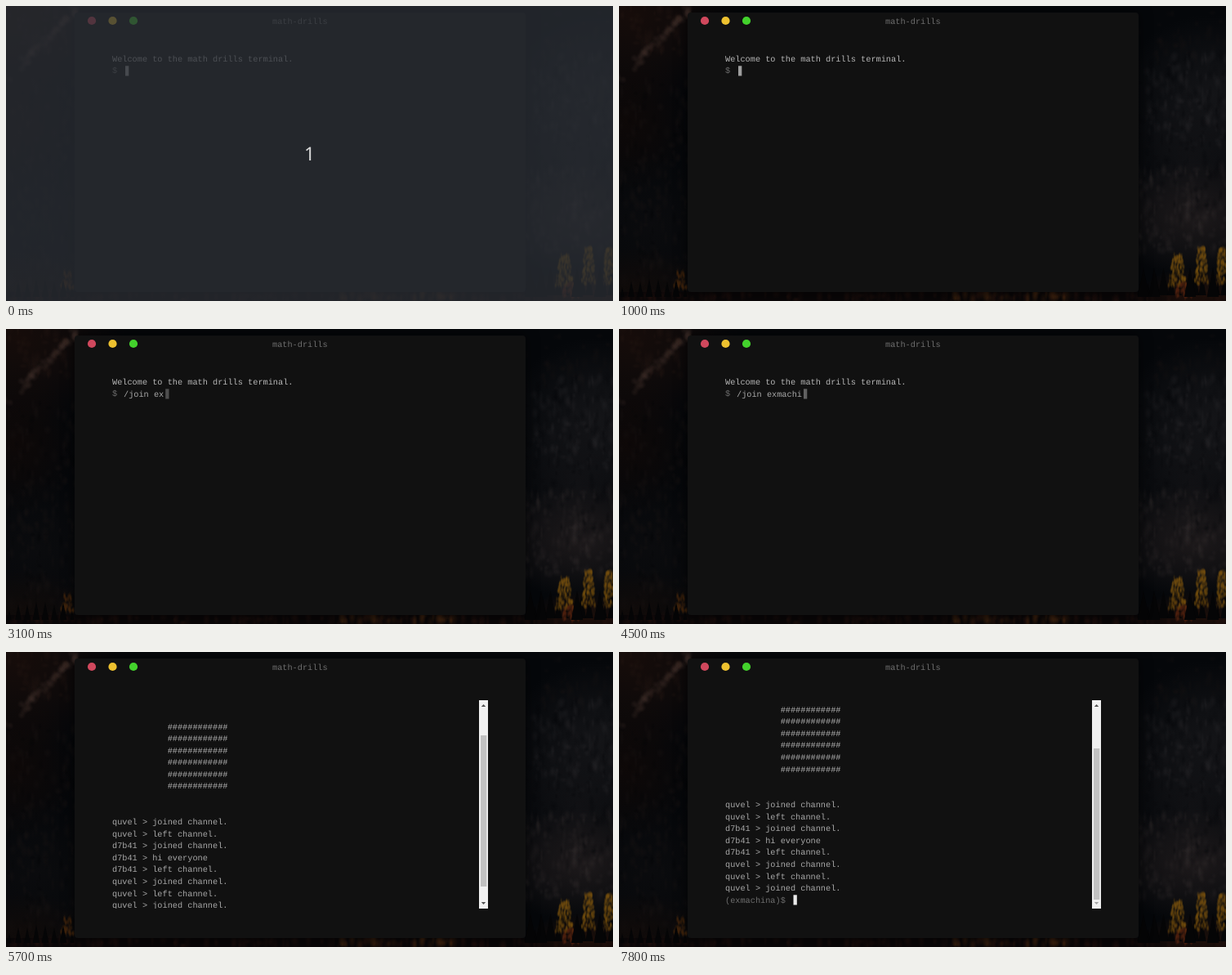
These frames come from a looping animation (743x361 px, 8000 ms). An HTML page with a canvas:

```html
<!DOCTYPE html>
<html lang="en">
<head>
<meta charset="utf-8">
<title>math-drills</title>
<style>
html, body { margin: 0; width: 100%; height: 100%; overflow: hidden; background: #040608; }
canvas { display: block; }
</style>
</head>
<body>
<canvas id="stage" width="743" height="361"></canvas>
<script>
const W = 743, H = 361, LOOP = 8000;
const ctx = document.getElementById('stage').getContext('2d');
const MONO = '10.25px "Liberation Mono", "Courier New", monospace';
const LEFT = 130, CELL = 6.151, TOP = 68.5, ROW = 14.57;
const BRIGHT = '#b6b6b6', PLAIN = '#a8a8a8', DIM = '#6e6e6e';

const COMMAND = '/join exmachina';
const KEYS = [1400, 1900, 2100, 2200, 2500, 2600, 2700, 2900, 3500, 3700, 4100, 4200, 4400, 4600, 4700];
const ENTER = 5300, BANNER = 5600, HISTORY = 5700, PROMPT = 5800;

const JOIN = 'joined channel.', LEAVE = 'left channel.';
const A = 'quvel', B = 'd7b41';
const CHAT = [[A, JOIN], [A, LEAVE], [B, JOIN], [B, 'hi everyone'], [B, LEAVE], [A, JOIN], [A, LEAVE], [A, JOIN]];

function random(seed) {
  return () => {
    seed = (seed * 1664525 + 1013904223) >>> 0;
    return seed / 4294967296;
  };
}

function poly(g, color, ...p) {
  g.fillStyle = color;
  g.beginPath();
  for (let i = 0; i < p.length; i += 2) g.lineTo(p[i], p[i + 1]);
  g.fill();
}

// Soft elliptical patch of colour, given as "r,g,b"
function haze(g, x, y, rx, ry, rgb, alpha) {
  const fill = g.createRadialGradient(0, 0, 0, 0, 0, 1);
  fill.addColorStop(0, `rgba(${rgb},${alpha})`);
  fill.addColorStop(0.5, `rgba(${rgb},${alpha * 0.55})`);
  fill.addColorStop(1, `rgba(${rgb},0)`);
  g.save();
  g.translate(x, y);
  g.scale(rx, ry);
  g.fillStyle = fill;
  g.fillRect(-1, -1, 2, 2);
  g.restore();
}

// Fill a rectangle with small random smudges
function smudge(g, rnd, x, y, w, h, count, rgb, alpha) {
  for (let i = 0; i < count; i++) {
    haze(g, x + rnd() * w, y + rnd() * h, 2 + rnd() * 4, 3 + rnd() * 8, rgb, alpha * (0.4 + rnd() * 0.6));
  }
}

function spruce(g, x, base, h) {
  poly(g, '#050506', x, base - h, x + h * 0.2, base, x - h * 0.2, base);
}

function birch(g, rnd, x, base, w, h, rgb) {
  for (let i = 0; i < w * h / 7; i++) {
    const v = rnd(), half = w * (0.2 + 0.3 * v);
    haze(g, x + (rnd() * 2 - 1) * half, base - h + v * h, 1.8, 4, rgb, 0.2 + rnd() * 0.35);
  }
}

function landscape() {
  const c = document.createElement('canvas');
  c.width = W;
  c.height = H;
  const g = c.getContext('2d'), rnd = random(11);
  g.fillStyle = '#05070a';
  g.fillRect(0, 0, W, H);

  // Left slope with a pale ridge
  haze(g, 15, 10, 130, 110, '24,13,10', 0.9);
  haze(g, 10, 140, 80, 90, '17,9,7', 0.75);
  haze(g, 40, 270, 90, 90, '13,13,15', 0.7);
  haze(g, 20, 345, 90, 50, '20,12,9', 0.7);
  for (let i = 0; i < 60; i++) {
    const v = rnd();
    haze(g, 90 - 90 * v + rnd() * 8 - 4, 90 * v + rnd() * 10 - 5, 5, 5, '68,50,44', 0.28);
  }
  smudge(g, rnd, 0, 0, 75, 60, 40, '44,27,21', 0.3);
  smudge(g, rnd, 0, 90, 84, 250, 120, '26,20,19', 0.35);
  smudge(g, rnd, 0, 90, 84, 250, 60, '2,3,5', 0.4);

  // Right cliff
  haze(g, 725, 110, 110, 100, '25,25,28', 0.75);
  haze(g, 700, 190, 90, 90, '20,20,23', 0.7);
  haze(g, 705, 260, 110, 70, '34,29,30', 0.8);
  smudge(g, rnd, 636, 8, 107, 60, 35, '24,18,17', 0.3);
  smudge(g, rnd, 645, 60, 98, 110, 110, '48,46,49', 0.24);
  smudge(g, rnd, 636, 60, 107, 200, 120, '4,5,8', 0.4);
  smudge(g, rnd, 636, 195, 107, 105, 130, '56,49,49', 0.24);

  // Forest along the foot
  g.fillStyle = '#090607';
  g.fillRect(0, 350, W, 11);
  haze(g, 705, 350, 65, 30, '38,18,10', 0.7);
  smudge(g, rnd, 0, 352, W, 8, 130, '44,20,14', 0.35);
  smudge(g, rnd, 410, 351, 140, 7, 35, '88,48,16', 0.4);
  for (let i = 0; i < 12; i++) spruce(g, 638 + i * 9.5, 354, 14 + rnd() * 22);
  const yellow = '126,84,12';
  birch(g, rnd, 684, 342, 25, 38, yellow);
  birch(g, rnd, 713, 340, 20, 45, yellow);
  birch(g, rnd, 738, 340, 18, 44, yellow);
  birch(g, rnd, 690, 357, 24, 18, '92,36,14');
  birch(g, rnd, 75, 346, 17, 22, '82,44,12');
  for (const x of [642, 655, 699, 727]) spruce(g, x, 356, 36);
  for (let i = 0; i < 8; i++) spruce(g, 4 + i * 11, 356, 10 + rnd() * 14);

  g.shadowColor = 'rgba(0,0,0,0.6)';
  g.shadowBlur = 16;
  g.fillStyle = '#111';
  g.beginPath();
  g.roundRect(84, 8, 552, 342, 4);
  g.fill();
  g.shadowBlur = 0;

  ['#d0485d', '#edc12f', '#43d22c'].forEach((color, i) => {
    g.fillStyle = color;
    g.beginPath();
    g.arc(105 + i * 25.5, 18, 5.1, 0, 7);
    g.fill();
  });
  return c;
}

function ease(u) {
  let lo = 0, hi = 1, s = 0.5;
  const bez = (a, b) => 3 * a * s * (1 - s) ** 2 + 3 * b * s * s * (1 - s) + s ** 3;
  for (let i = 0; i < 20; i++) {
    s = (lo + hi) / 2;
    if (bez(0.25, 0.25) < u) lo = s; else hi = s;
  }
  return bez(0.1, 1);
}

// The cursor is darkest at 385 ms of each second and brightest half a second later
function glow(t) {
  const p = ((t + 615) % 1000) / 500;
  return p < 1 ? ease(p) : 1 - ease(p - 1);
}

function text(s, x, y, color) {
  ctx.fillStyle = color;
  ctx.fillText(s, x, y);
}

function cursor(x, base, t) {
  const v = Math.round(17 + 221 * glow(t));
  ctx.fillStyle = `rgb(${v},${v},${v})`;
  ctx.fillRect(x, base - 9.7, 4.3, 12.2);
}

function scrollbar(thumb, atEnd) {
  ctx.fillStyle = '#f1f1f1';
  ctx.fillRect(579, 59, 11, 255);
  ctx.fillStyle = '#c1c1c1';
  ctx.fillRect(581, thumb, 7.3, 185);
  poly(ctx, '#505050', 581.8, 67, 584.5, 64, 587.2, 67);
  poly(ctx, atEnd ? '#a3a3a3' : '#505050', 581.8, 306, 584.5, 309, 587.2, 306);
}

function terminal(t) {
  const scroll = t < HISTORY ? 0 : t < PROMPT ? 46.3 : 67.2;
  const rowY = i => Math.floor(TOP + i * ROW - scroll);
  const typed = KEYS.filter(k => k <= t).length;

  ctx.save();
  ctx.beginPath();
  ctx.rect(120, 59, 480, 255);
  ctx.clip();
  text('Welcome to the math drills terminal.', LEFT, rowY(0), BRIGHT);
  text('$', LEFT, rowY(1) - 1, DIM);
  text(COMMAND.slice(0, typed), 144, rowY(1), PLAIN);
  if (t < ENTER) cursor(146 + typed * CELL, rowY(1), t);
  else text(`${A} > ${JOIN}`, LEFT, rowY(2), PLAIN);
  if (t >= BANNER) {
    for (let i = 5; i < 11; i++) text('#'.repeat(12), LEFT + 11 * CELL, rowY(i), BRIGHT);
  }
  if (t >= HISTORY) {
    CHAT.forEach(([who, what], i) => text(`${who} > ${what}`, LEFT, rowY(13 + i), PLAIN));
    scrollbar(t < PROMPT ? 102 : 118, t >= PROMPT);
  }
  if (t >= PROMPT) {
    text('(exmachina)$', LEFT, rowY(21), DIM);
    cursor(213.5, rowY(21), t);
  }
  ctx.restore();
}

function countdown() {
  ctx.fillStyle = 'rgba(43,47,53,0.76)';
  ctx.fillRect(0, 0, W, H);
  ctx.font = '23px "Noto Sans", "Open Sans", sans-serif';
  ctx.textAlign = 'center';
  text('1', 371.5, 189, '#d8d8d8');
  ctx.textAlign = 'left';
}

const scene = landscape();

function draw() {
  const t = performance.now() % LOOP;
  ctx.drawImage(scene, 0, 0);
  ctx.font = MONO;
  ctx.textRendering = 'geometricPrecision';
  text('math-drills', 326, 22, DIM);
  // Screen updates come ten times a second
  const tick = Math.min(Math.floor(t / 100) * 100, 7800);
  terminal(tick);
  if (t < 100) countdown();
  requestAnimationFrame(draw);
}
draw();
</script>
</body>
</html>
```
